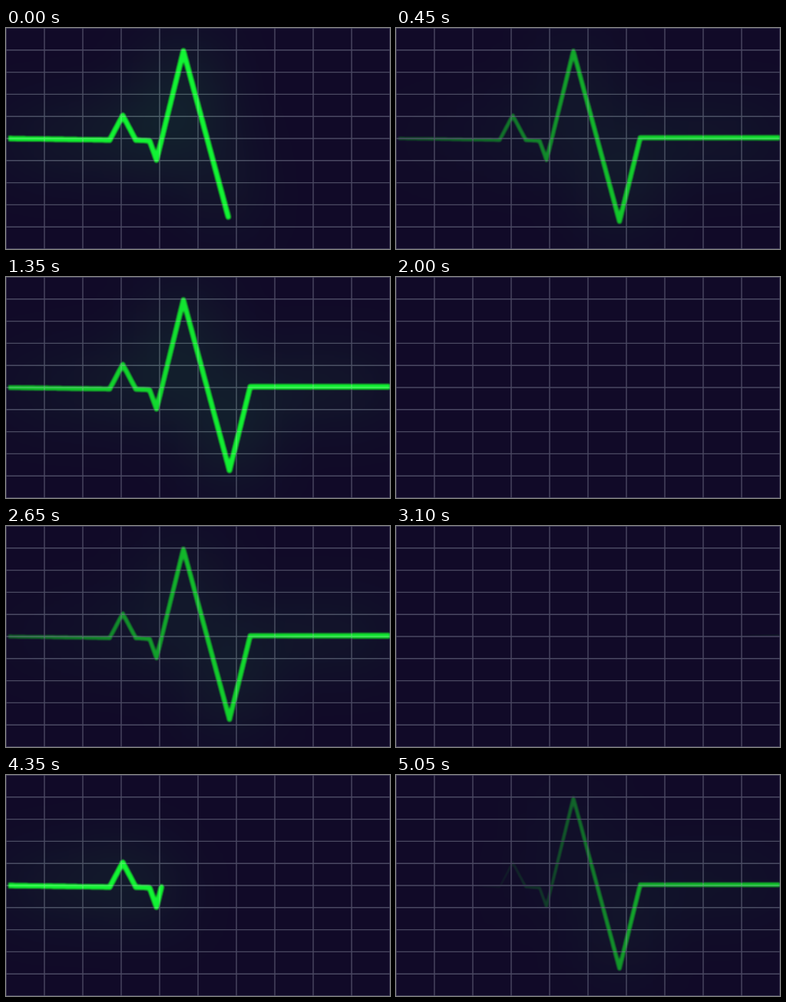
Write an HTML page with a canvas that moves like this. It is 500x288 px and loops after 5100 ms.

```html
<!DOCTYPE html>
<html lang="en">
<head>
<meta charset="utf-8">
<title>Heartbeat trace</title>
<style>
  html, body { margin: 0; width: 100%; height: 100%; overflow: hidden; background: #110a28; }
  canvas { display: block; width: 500px; height: 288px; }
</style>
</head>
<body>
<canvas id="stage" width="500" height="288"></canvas>
<script>
const W = 500, H = 288;
const LOOP = 5100, STEP = 50;   // ms
const BEAT = 1120;              // ms between pulses
const LEAD = 235;               // ms already drawn when the loop starts
const SPEED = 2.626;            // px of path per ms
const LIFE = 780;               // ms until a point has faded out
const TRACE = [[3, 144], [135, 146], [152, 114], [169, 146], [187, 147],
               [196, 172], [231, 30], [291, 252], [318, 143], [504, 143]];

const ctx = document.getElementById('stage').getContext('2d');
const layer = document.createElement('canvas');
layer.width = W;
layer.height = H;
const pen = layer.getContext('2d');
pen.lineCap = 'round';
pen.beginPath();
pen.rect(3, 0, W, H);
pen.clip();

// Split the trace into short pieces, each with its distance along the path.
const pieces = [];
let length = 0;
for (let i = 1; i < TRACE.length; i++) {
  const [x0, y0] = TRACE[i - 1], [x1, y1] = TRACE[i];
  const dist = Math.hypot(x1 - x0, y1 - y0), n = Math.ceil(dist / 3);
  for (let k = 0; k < n; k++) {
    const at = u => [x0 + (x1 - x0) * u, y0 + (y1 - y0) * u];
    pieces.push({ s: length + dist * k / n, a: at(k / n), b: at((k + 1) / n) });
  }
  length += dist;
}

function drawGrid() {
  ctx.fillStyle = '#110a28';
  ctx.fillRect(0, 0, W, H);
  ctx.strokeStyle = '#4a4862';
  ctx.lineWidth = 1.4;
  ctx.beginPath();
  for (let k = 0; k <= 10; k++) {
    const x = k * W / 10, y = k * H / 10;
    ctx.moveTo(x, 0);
    ctx.lineTo(x, H);
    ctx.moveTo(0, y);
    ctx.lineTo(W, y);
  }
  ctx.stroke();
}

function drawTrace(phase) {
  pen.globalCompositeOperation = 'source-over';
  pen.fillStyle = '#000';
  pen.fillRect(0, 0, W, H);
  pen.globalCompositeOperation = 'lighten';
  for (const { s, a, b } of pieces) {
    const age = phase - s / SPEED;
    if (age < 0 || age >= LIFE) continue;
    const glow = 1 - Math.pow(age / LIFE, 3);
    pen.strokeStyle = `rgb(${16 * glow}, ${244 * glow}, ${52 * glow})`;
    pen.lineWidth = 3.2 + 3.8 * glow;
    pen.beginPath();
    pen.moveTo(...a);
    pen.lineTo(...b);
    pen.stroke();
  }
}

function blend(mode, blur, alpha) {
  ctx.save();
  ctx.globalCompositeOperation = mode;
  ctx.globalAlpha = alpha;
  ctx.filter = `blur(${blur}px)`;
  ctx.drawImage(layer, 0, 0);
  ctx.restore();
}

function render(time) {
  const t = Math.floor((time % LOOP) / STEP) * STEP;
  drawGrid();
  drawTrace((t + LEAD) % BEAT);
  blend('lighter', 45, 0.7);
  blend('lighten', 1, 1);
}

let start;
function tick(now) {
  start ??= now;
  render(now - start);
  requestAnimationFrame(tick);
}
render(0);
requestAnimationFrame(tick);
</script>
</body>
</html>
```
